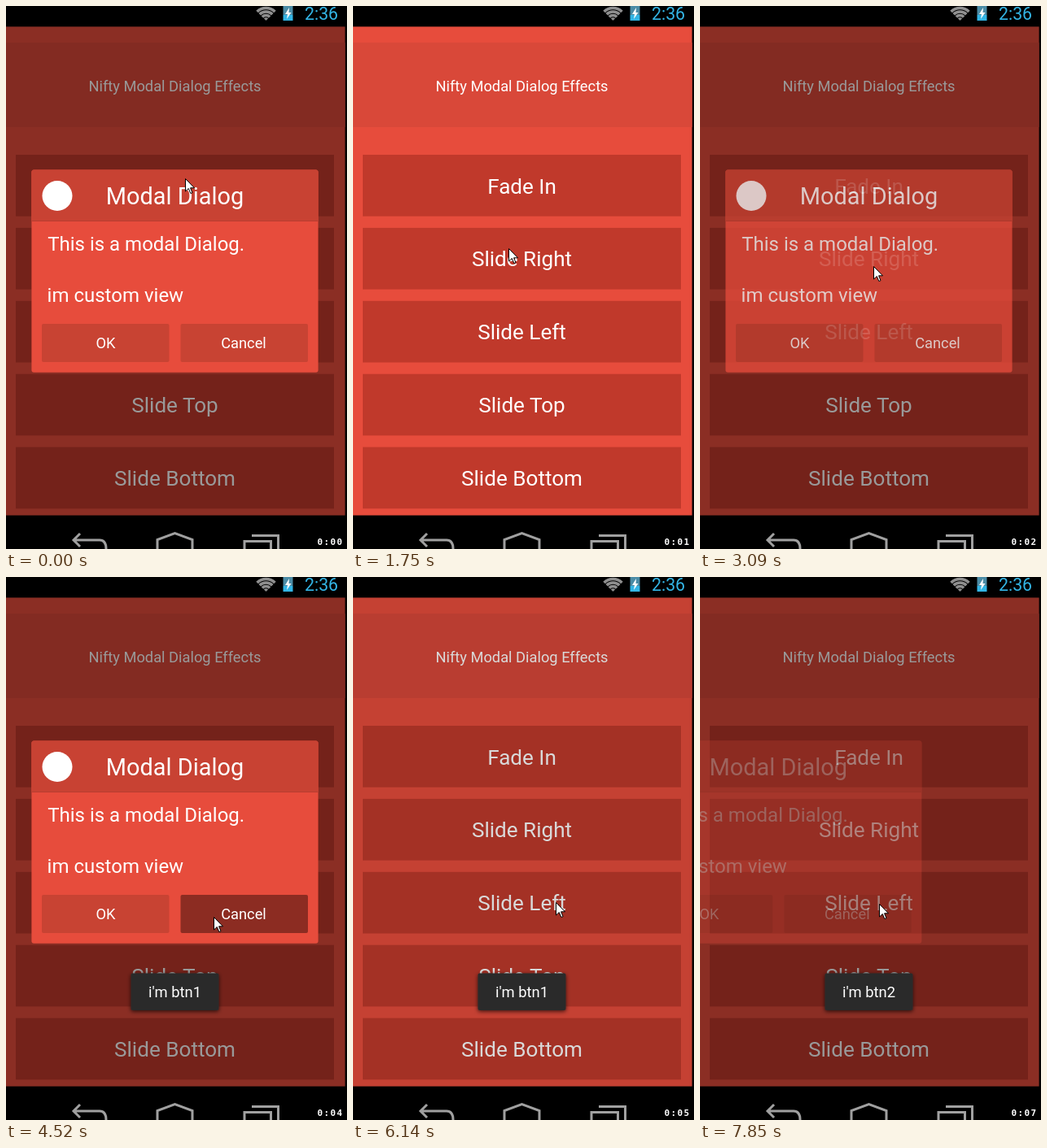
Animation, 419 px wide and 668 px high, one loop 8000 ms. Source, as an HTML page:

```html
<!DOCTYPE html>
<html lang="en">
<head>
<meta charset="utf-8">
<title>Modal dialog effects</title>
<style>
  html, body { margin: 0; width: 100%; height: 100%; overflow: hidden; background: #000; }
  svg { display: block; width: 419px; height: 668px; }
  text { font-family: Roboto, "Open Sans", sans-serif; fill: #fff; }
  #timer { font: bold 11px "DejaVu Sans Mono", monospace; letter-spacing: 1.4px; }
  .icon { fill: none; stroke: #a0a0a0; stroke-width: 3; }
</style>
</head>
<body>
<svg id="stage" viewBox="0 0 419 668"></svg>
<script>
const LOOP = 8000;

// The screen stands still from the first to the second time of each pair.
const stalls = [[0, 740], [4670, 5200], [5470, 5900], [7290, 7730]];

// Pointer moves from its last resting place
const moves = [
  { from: 1100, to: 1750, x: 191, y: 298 },
  { from: 1750, to: 2160, x: 213, y: 320 },
  { from: 3200, to: 3850, x: 171, y: 420 },
  { from: 4000, to: 4370, x: 255, y: 418 },
  { from: 5200, to: 5470, x: 260, y: 419 },
  { from: 5900, to: 6550, x: 230, y: 367 },
  { from: 6600, to: 7170, x: 220, y: 402 }
];

// Each showing of the dialog: start of entry, start of exit, slide-in offset
const shows = [
  { enter: -5000, exit: 700, offset: 0 },
  { enter: 2390, exit: 5825, offset: 261 },
  { enter: 7468, exit: Infinity, offset: -261 }
];

const effects = ['Fade In', 'Slide Right', 'Slide Left', 'Slide Top', 'Slide Bottom'];
const PITCH = 89.9;

const $ = id => document.getElementById(id);
const rect = (x, y, w, h, fill, more = '') =>
  `<rect x="${x}" y="${y}" width="${w}" height="${h}" fill="${fill}" ${more}/>`;
const label = (s, x, y, size, anchor = 'middle') =>
  `<text x="${x}" y="${y}" font-size="${size}" text-anchor="${anchor}">${s}</text>`;
const toast = (id, s) => `<g id="${id}">` +
  rect(153.5, 487.5, 108, 45.5, '#2a2a2a', 'rx="2" filter="url(#shadow)"') +
  label(s, 207.5, 517, 18.4) + '</g>';
const wifiArc = r => {
  const d = r * Math.SQRT1_2;
  return `<path d="M${319.5 - d} ${18 - d}A${r} ${r} 0 0 1 ${319.5 + d} ${18 - d}"
    fill="none" stroke="#8f8f8f" stroke-width="3.6"/>`;
};

$('stage').innerHTML = `
  <defs>
    <filter id="shadow" x="-10%" y="-20%" width="120%" height="150%">
      <feDropShadow dx="0" dy="1.5" stdDeviation="2.4" flood-opacity=".7"/>
    </filter>
    <clipPath id="screen">${rect(0, 25, 417, 602, '#000')}</clipPath>
  </defs>
  ${rect(0, 0, 419, 668, '#000')}
  ${[2, 6.5, 11, 15.5].map(wifiArc).join('')}
  ${rect(340.5, 0, 12, 11, '#4b8ca6') + rect(340.5, 11, 12, 7, '#33b5e5')}
  <path d="M348 2L343 10H346L345 16L350.5 8H347.5Z" fill="#fff"/>
  <text x="367" y="17" font-size="21.3" style="fill:#33b5e5">2:36</text>
  <g clip-path="url(#screen)">
    ${rect(0, 25.4, 416.6, 601.2, '#e74c3c')}
    ${rect(0, 45, 416.6, 104, '#d94839')}
    ${label('Nifty Modal Dialog Effects', 207.5, 104.5, 18.3)}
    ${effects.map((s, i) => rect(12, 183 + PITCH * i, 391, 75.7, '#c0392b') +
      label(s, 207.5, 230.5 + PITCH * i, 26.1)).join('')}
    ${rect(0, 25, 417, 602, '#000', 'id="dim"')}
    <g id="dialog">
      ${rect(31.4, 201.4, 352.2, 249.4, '#e74c3c', 'rx="3"')}
      <path d="M31.4 265V204.4a3 3 0 0 1 3-3H380.600a3 3 0 0 1 3 3V265Z" fill="#c84233"/>
      ${rect(31.4, 264, 352.2, 1, '#b83d30')}
      <circle cx="63" cy="233.5" r="18.5" fill="#fff"/>
      ${label('Modal Dialog', 207.5, 244, 28.9)}
      ${label('This is a modal Dialog.', 51.2, 301, 24, 'start')}
      ${label('im custom view', 50.6, 364, 24, 'start')}
      ${rect(44, 391, 156.5, 47, '#c84333', 'rx="2"')}
      ${rect(214.5, 391, 156.5, 47, '#c84333', 'rx="2" id="cancel"')}
      ${label('OK', 122.5, 421, 18.3)}
      ${label('Cancel', 292, 421, 18.3)}
    </g>
  </g>
  ${toast('toast1', "i'm btn1")}
  ${toast('toast2', "i'm btn2")}
  <path class="icon" d="M91 649L83 657L91 665M83 657H115Q123 657 123 668"/>
  <path class="icon" d="M186 668V656.5L207.5 648.5L229 656.5V668"/>
  <path class="icon" d="M293 668V658.5H325.5V668M302 651.5H334.5V668"/>
  <text id="timer" x="382.5" y="663"></text>
  <path id="arrow" d="M.5 .5V16L4.3 12.5L6.8 18.5L9 17.7L6.6 11.8H11.5Z"
    fill="#fff" stroke="#000"/>`;

const ramp = (t, start, length) => Math.min(1, Math.max(0, (t - start) / length));
const ease = p => (1 - Math.cos(Math.PI * p)) / 2;

function pointerAt(t) {
  let x = 220, y = 212;
  for (const m of moves) {
    const p = ramp(t, m.from, m.to - m.from);
    x += (m.x - x) * p;
    y += (m.y - y) * p;
  }
  return [Math.round(x), Math.round(y)];
}

function draw(t) {
  const show = shows.findLast(s => t >= s.enter);
  const leave = ramp(t, show.exit, 125);
  const slide = show.offset * (1 - ease(ramp(t, show.enter, 700)));
  const alpha = ease(ramp(t, show.enter, 1050)) * (1 - leave ** 1.3);
  const dim = ramp(t, show.enter, 380) * (1 - ramp(t, show.exit, 500));

  $('dim').setAttribute('opacity', 0.4 * dim);
  $('dialog').setAttribute('opacity', alpha);
  $('dialog').setAttribute('transform',
    `translate(${207.5 + slide} 326) scale(${1 - 0.1 * leave}) translate(-207.5 -326)`);
  $('cancel').setAttribute('fill', t >= 4520 && t < 4670 ? '#8c2c22' : '#c84333');
  $('toast1').setAttribute('opacity', ramp(t, 3930, 500) * (1 - ramp(t, 6400, 300)));
  $('toast2').setAttribute('opacity', ramp(t, 6300, 400));
  $('timer').textContent = '0:0' + Math.floor(t / 1040);
  $('arrow').setAttribute('transform', `translate(${pointerAt(t)})`);
}

function tick() {
  const t = performance.now() % LOOP;
  const stall = stalls.find(([start, end]) => t >= start && t < end);
  draw(stall ? stall[0] : t);
  requestAnimationFrame(tick);
}
tick();
</script>
</body>
</html>
```
